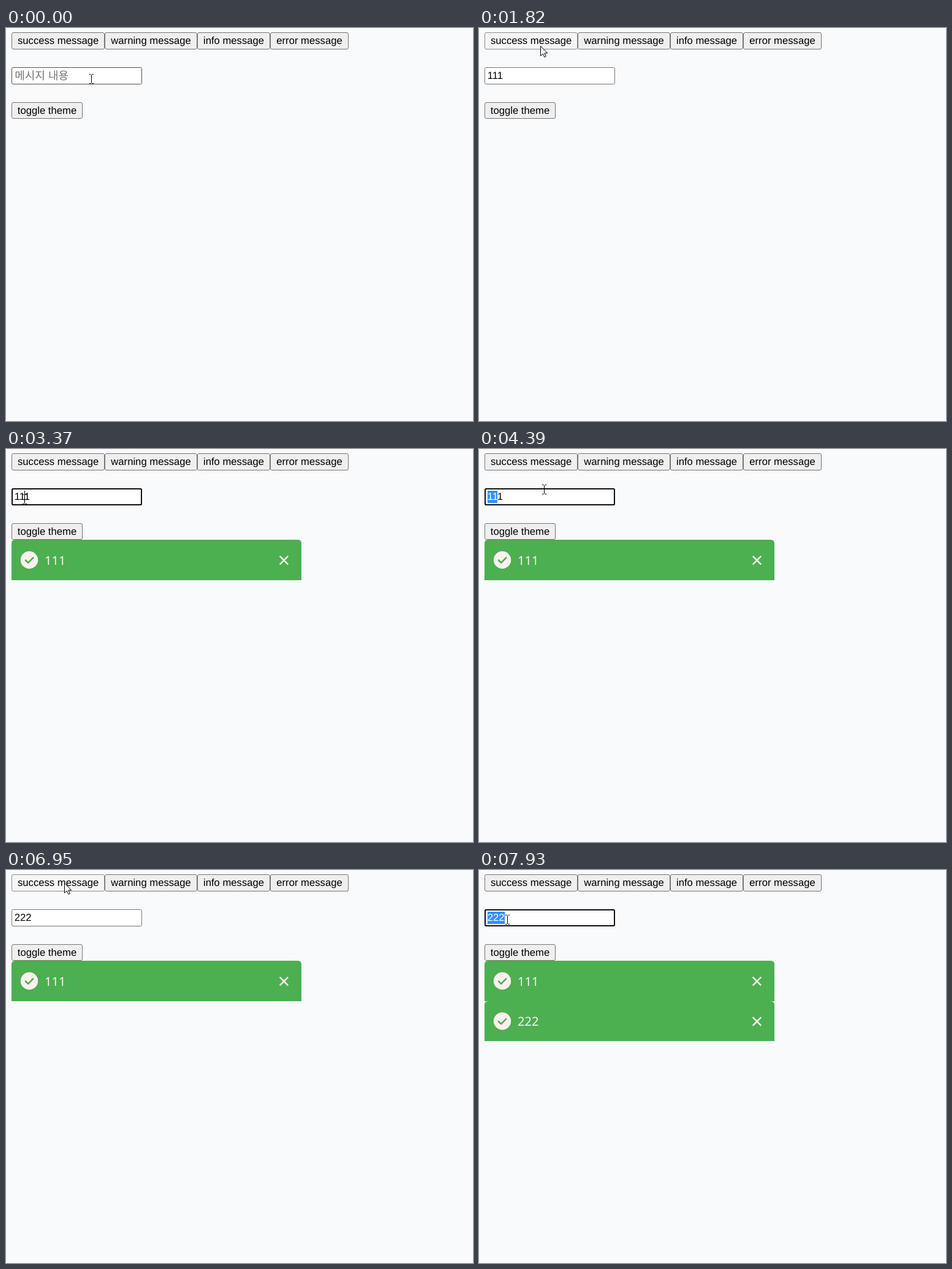
An HTML page for the animation above (7.99 s loop, 762x641 px).

```html
<!DOCTYPE html>
<html lang="ko">
<head>
<meta charset="utf-8">
<title>Toast messages</title>
<style>
html, body { margin: 0; width: 100%; height: 100%; overflow: hidden; background: #f8fafc; }
svg { display: block; width: 762px; height: 641px; }
text { font: 16.667px "Liberation Sans", Arial, sans-serif; text-rendering: geometricPrecision; white-space: pre; }
.button rect { fill: #efefef; stroke: #767676; }
.button text { text-anchor: middle; }
.hint { font: 300 18px "Noto Sans CJK KR", "Noto Sans CJK", sans-serif; fill: #757575; }
.toast { fill: #4caf50; }
.toast text { font: 20px "Noto Sans", "Open Sans", sans-serif; fill: #fdf1ef; }
.check, .close { fill: none; stroke-width: 2.4; }
.check { stroke: #4caf50; stroke-width: 2.6; stroke-linecap: round; stroke-linejoin: round; }
.close { stroke: #fdf1ef; }

/* One shared loop; state changes are hard steps, only the pointer glides. */
.anim { animation: 7990ms step-end infinite; }
.press { animation-name: press; }
.field { fill: #fff; stroke: #4f4f4f; animation-name: field; }
.focus { animation-name: focus; opacity: 0; }
.hint { animation-name: hint; }
.ones { animation-name: ones; }
.twos { animation-name: twos; }
.select { animation-name: select; }
.caret { animation-name: caret; opacity: 0; }
.first { animation-name: first; opacity: 0; }
.second { animation-name: second; opacity: 0; }
.pointer { animation: move 7990ms linear infinite; }
.beam { animation-name: beam; }
.arrow { animation-name: arrow; opacity: 0; }

@keyframes press {
  0%, 23.73%, 88.16% { fill: #efefef; stroke: #767676; }
  19.15%, 23.278%, 85.34%, 87.609% { fill: #e5e5e5; stroke: #4f4f4f; }
  22.777%, 86.983% { fill: #f5f5f5; stroke: #8d8d8d; }
}
@keyframes field {
  0%, 25.94%, 89.29% { stroke: #4f4f4f; }
  17.38%, 83.25% { stroke: #767676; }
}
@keyframes focus {
  0%, 22.777%, 86.983% { opacity: 0; }
  6.883%, 37.3%, 93.24% { opacity: 1; }
}
@keyframes hint {
  0%, 69.211% { opacity: 1; }
  13.141%, 71.213% { opacity: 0; }
}
@keyframes ones {
  0%, 69.211% { width: 0; }
  13.141%, 66.958% { width: 9.5px; }
  14.39% { width: 17.5px; }
  15.64% { width: 30px; }
}
@keyframes twos {
  0% { width: 0; }
  71.213% { width: 9.9px; }
  73.466% { width: 19.2px; }
  74.717% { width: 30px; }
}
@keyframes select {
  0%, 66.958% { x: 14px; width: 0; }
  43.05% { x: 22px; width: 8px; }
  44.05% { x: 14px; width: 16px; }
  93.9% { x: 32px; width: 10px; }
  94.5% { x: 23px; width: 19px; }
  95.1% { x: 14px; width: 28px; }
}
@keyframes caret {
  0%, 22.777%, 43.05%, 86.983%, 93.9% { opacity: 0; transform: none; }
  6.883%, 66.958% { opacity: 1; transform: none; }
  13.141% { opacity: 1; transform: translateX(8px); }
  14.39%, 37.3% { opacity: 1; transform: translateX(16px); }
  15.64% { opacity: 1; transform: translateX(25px); }
  71.213% { opacity: 1; transform: translateX(9px); }
  73.466% { opacity: 1; transform: translateX(18px); }
  74.717%, 93.24% { opacity: 1; transform: translateX(27px); }
}
@keyframes first { 0% { opacity: 0; } 23.278% { opacity: 1; } 100% { opacity: 1; } }
@keyframes second { 0% { opacity: 0; } 87.609% { opacity: 1; } 100% { opacity: 1; } }
@keyframes move {
  0%, 16.27% { transform: translate(139px, 83px); }
  17.9% { transform: translate(124px, 55px); }
  19.52%, 23.28% { transform: translate(100px, 29px); }
  27.53%, 31.79% { transform: translate(106px, 85px); }
  37.3%, 42.17% { transform: translate(30px, 82px); }
  44.1%, 45.5% { transform: translate(16px, 80px); }
  48.4% { transform: translate(132px, 95px); }
  51.69%, 54.19% { transform: translate(95px, 69px); }
  54.94%, 83.1% { transform: translate(106px, 66px); }
  86.35%, 87.61% { transform: translate(95px, 21px); }
  89.98%, 92.24% { transform: translate(48px, 82px); }
  95.5% { transform: translate(6px, 92px); }
  99.24%, 100% { transform: translate(46px, 81px); }
}
@keyframes beam {
  0%, 25.94%, 89.29% { opacity: 1; }
  17.38%, 83.25% { opacity: 0; }
}
@keyframes arrow {
  0%, 25.94%, 89.29% { opacity: 0; }
  17.38%, 83.25% { opacity: 1; }
}
</style>
</head>
<body>
<svg viewBox="0 0 762 641">
  <defs>
    <clipPath id="ones"><rect class="anim ones" x="13" y="66" width="0" height="24"/></clipPath>
    <clipPath id="twos"><rect class="anim twos" x="13" y="66" width="0" height="24"/></clipPath>
    <clipPath id="select"><rect class="anim select" x="14" y="68" width="0" height="20"/></clipPath>
    <g id="icons">
      <circle cx="38" cy="181" r="14.2" fill="#fdf1ef"/>
      <path class="check" d="M32 181.5l4.2 4.2 8-8.4"/>
      <path class="close" d="M446.7 174.7l13.6 13.6m0-13.6l-13.6 13.6"/>
    </g>
  </defs>

  <g class="button">
    <rect class="anim press" x="9.5" y="7.5" width="151" height="27" rx="2.5"/>
    <text x="85.2" y="26">success message</text>
    <rect x="161.5" y="7.5" width="150" height="27" rx="2.5"/>
    <text x="236.6" y="26">warning message</text>
    <rect x="312.5" y="7.5" width="118" height="27" rx="2.5"/>
    <text x="371.5" y="26">info message</text>
    <rect x="431.5" y="7.5" width="127" height="27" rx="2.5"/>
    <text x="495" y="26">error message</text>
    <rect x="9.5" y="121.5" width="115" height="26" rx="2.5"/>
    <text x="67" y="140">toggle theme</text>
  </g>

  <rect class="anim field" x="9.5" y="64.5" width="212" height="27" rx="2"/>
  <rect class="anim focus" x="10" y="65" width="211" height="26" rx="2" fill="#fff" stroke="#101010" stroke-width="2"/>
  <text class="anim hint" x="14.2" y="83.5">메시지 내용</text>
  <g id="typed">
    <g clip-path="url(#ones)"><text x="13.7" y="83">111</text></g>
    <g clip-path="url(#twos)"><text x="13.7" y="83">222</text></g>
  </g>
  <g clip-path="url(#select)">
    <rect x="14" y="68" width="28" height="20" fill="#3390ff"/>
    <use href="#typed" fill="#fff"/>
  </g>
  <rect class="anim caret" x="14" y="68" width="1" height="19"/>

  <g class="toast">
    <g class="anim first">
      <path d="M9 214V154q0-6 6-6H476q6 0 6 6V214z"/>
      <use href="#icons"/>
      <text x="63" y="189">111</text>
    </g>
    <g class="anim second">
      <path d="M9 279V220q0-6 6-6H476q6 0 6 6V279z"/>
      <use href="#icons" y="65.5"/>
      <text x="63" y="254">222</text>
    </g>
  </g>

  <g class="pointer">
    <path class="anim beam" d="M-3 -7.5h2.5m2 0h2.5M.5 -7v14M-3 7.5h2.5m2 0h2.5" fill="none" stroke="#000"/>
    <path class="anim arrow" d="M.5 .5V16.5L4.3 13L6.8 18.6L9.2 17.5L6.8 12H11.7z" fill="#fff" stroke="#000"/>
  </g>
</svg>
</body>
</html>
```
